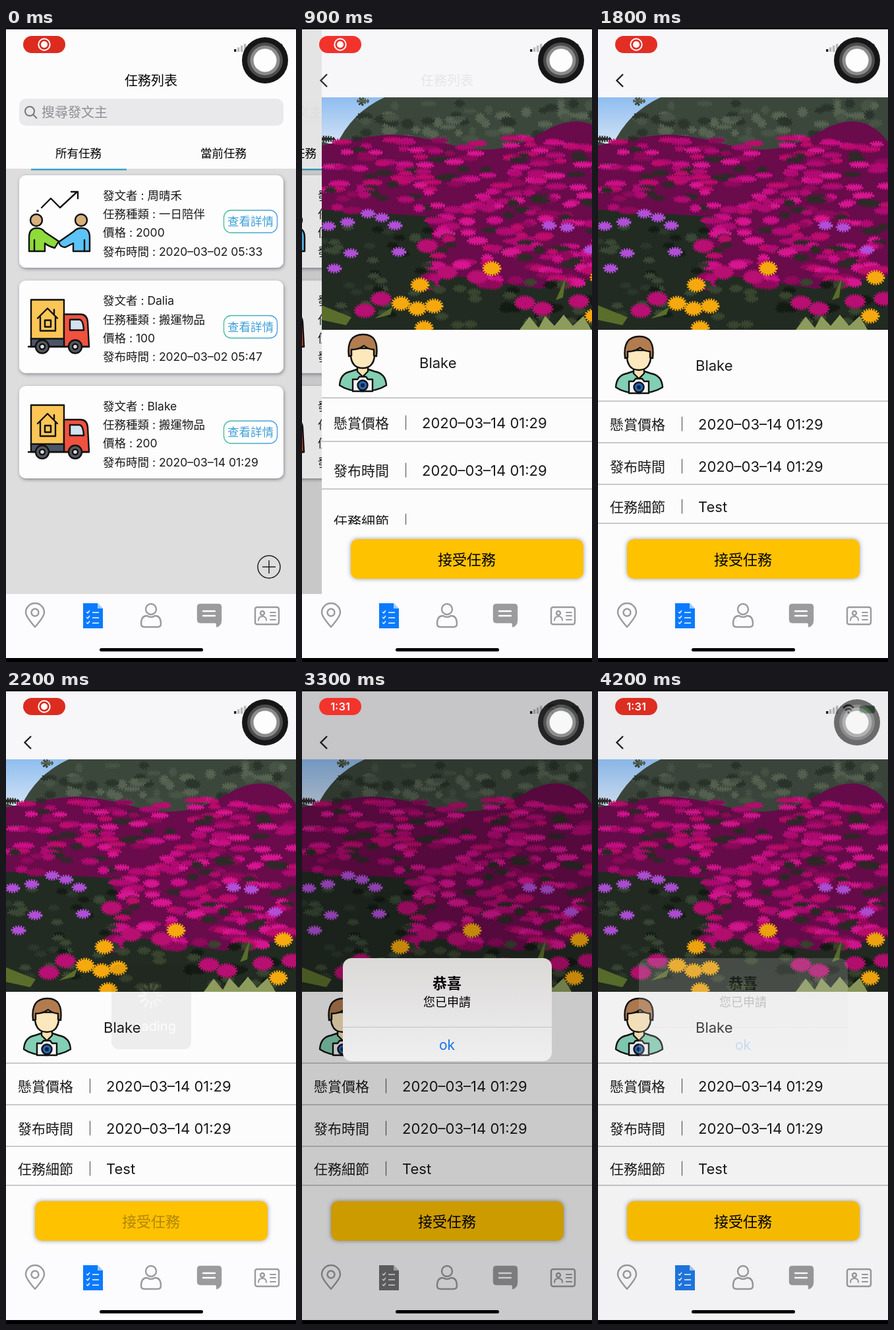
These frames come from a looping animation (440 by 960 pixels, 4.3 s). An HTML page:

```html
<!DOCTYPE html>
<html lang="zh-Hant">
<head>
<meta charset="utf-8">
<style>
html, body { margin: 0; width: 100%; height: 100%; overflow: hidden; background: #000; }
svg { display: block; }
text { font-family: Inter, "Noto Sans CJK TC", "Noto Sans CJK", sans-serif; white-space: pre; }
.ink { stroke: #111; stroke-width: 2.4; stroke-linejoin: round; stroke-linecap: round; }
.tab { fill: none; stroke: #9b9b9d; stroke-width: 2.4; stroke-linecap: round; stroke-linejoin: round; }
.petals { stroke-width: 5; stroke-dasharray: 2 1.6; }
</style>
</head>
<body>
<svg id="stage" width="440" height="960" viewBox="0 0 440 960"></svg>
<script>
const $ = id => document.getElementById(id);
const LOOP = 4300, WIDTH = 440;

const text = (x, y, str, size, attrs = 'fill="#1a1a1a"') =>
  `<text x="${x}" y="${y + size * .37}" font-size="${size}" ${attrs}>${str}</text>`;
const mid = 'text-anchor="middle"';
const rect = (x, y, w, h, fill, attrs = '') =>
  `<rect x="${x}" y="${y}" width="${w}" height="${h}" fill="${fill}" ${attrs}/>`;
const circle = (x, y, r, fill, attrs = '') =>
  `<circle cx="${x}" cy="${y}" r="${r}" fill="${fill}" ${attrs}/>`;
const ellipse = (x, y, rx, ry, color) =>
  `<ellipse cx="${x.toFixed(1)}" cy="${y.toFixed(1)}" rx="${rx.toFixed(1)}" ry="${ry.toFixed(1)}" fill="${color}" stroke="${color}"/>`;
const path = (d, fill = 'none', attrs = '') => `<path d="${d}" fill="${fill}" ${attrs}/>`;
const times = (n, fn) => Array.from({ length: n }, (_, i) => fn(i)).join('');

let seed = 11;
const rand = () => (seed = (seed * 16807) % 2147483647) / 2147483647;
const pick = list => list[Math.floor(rand() * list.length)];

// ---- list page ----
const handshake = `<g class="ink">
  ${path('M35 115V94q0-14 12-14q8 0 12 6l21 14l-6 10q-9-2-15-7v12z', '#8edb3a')}
  ${path('M127 115V94q0-14-12-14q-8 0-12 5l-23 16q2 8 10 8l12-6v12z', '#5cc3f6')}
  ${path('M43 115V98M119 115V98')}
  ${circle(46, 68, 9, '#d8b07c')}${circle(114, 68, 9, '#d8b07c')}
  ${path('M54 49l14-14l14 14l26-24M99 25h10v10')}
  ${circle(48, 54, .6, '#111')}</g>`;

const truck = `<g class="ink">
  ${rect(38, 29, 50, 61, '#fbc656')}
  ${path('M88 51h25q10 0 11 12l2 37H88z', '#f0523f')}
  ${path('M97 59h14q6 0 7 16H97z', '#d3e2ef')}
  ${rect(38, 88, 50, 12, '#4b5568')}
  ${path('M34 100h92M48 57l15-15l15 15M52 55v21h23V55M59 60h9v10h-9zM73 44v6')}
  ${circle(55, 100, 10, '#55585f')}${circle(105, 100, 10, '#55585f')}
  ${circle(55, 100, 4, '#ddd')}${circle(105, 100, 4, '#ddd')}</g>`;

const tasks = [
  ['周晴禾', '一日陪伴', 2000, '2020–03–02 05:33'],
  ['Dalia', '搬運物品', 100, '2020–03–02 05:47'],
  ['Blake', '搬運物品', 200, '2020–03–14 01:29']
];

const card = ([name, kind, price, date], i) => `<g transform="translate(0 ${223 + i * 159.5})">
  ${rect(20, 0, 401, 140, '#fdfdfd', 'rx="10" filter="url(#shadow)"')}
  ${i ? truck : handshake}
  ${[`發文者 : ${name}`, `任務種類 : ${kind}`, `價格 : ${price}`, `發布時間 : ${date}`]
    .map((line, k) => text(147, 30.5 + k * 28.2, line, 17.5)).join('')}
  <g id="more${i}">${rect(330.5, 53, 81, 34, '#fff', 'rx="11" stroke="url(#edge)" stroke-width="1.3"')}
  ${text(371, 70, '查看詳情', 17.5, mid + ' fill="#3f9fd6"')}</g></g>`;

const listPage = `<g id="list">
  ${rect(0, 0, WIDTH, 213, '#fdfcfd')}${rect(0, 213, WIDTH, 650, '#ddd')}
  <g id="search">${rect(20, 107, 401, 41, '#e9e9eb', 'rx="10"')}
  <g fill="none" stroke="#77777b" stroke-width="2">${circle(36, 126, 7, 'none')}${path('M41 131l6 6')}</g>
  ${text(54, 127.5, '搜尋發文主', 20, 'fill="#8e8e93"')}</g>
  ${text(110, 190, '所有任務', 17.5, mid)}${text(330, 190, '當前任務', 17.5, mid)}
  ${rect(38, 213, 145, 2.5, '#3ba6c8')}
  ${tasks.map(card).join('')}
  <g fill="none" stroke="#222" stroke-width="1.5">${circle(399, 816, 17, 'none')}${path('M389 816h20M399 806v20')}</g>
  </g>${rect(0, 0, WIDTH, 960, '#000', 'id="shade"')}`;

// ---- detail page ----
const pinks = ['#c90f86', '#b00b72', '#d6168f', '#bd0c6c', '#900a5c'];
const blobs = (list, rx, ry, color) => list.map(([x, y]) => ellipse(x, y, rx, ry, color)).join('');
const inShade = (x, y) => x < 165 && y > 278;

const photo = `<g clip-path="url(#photoClip)">
  ${rect(0, 105, WIDTH, 352, '#222b22')}
  ${rect(0, 105, 110, 80, 'url(#sky)')}
  ${path('M22 178Q45 128 95 105H440V200H0V172z', '#3c473c')}
  <g class="petals">
  ${times(70, () => ellipse(60 + rand() * 380, 110 + rand() * 62, 3 + rand() * 8, 2 + rand() * 4,
    pick(['#2b352c', '#566352', '#475446'])))}
  ${path('M0 178Q60 165 95 162T200 178T335 158T440 172V375L330 395L180 372L160 285L0 275z', '#6a0b4c')}
  ${times(320, i => {
    const x = rand() * WIDTH, depth = i / 320, y = 166 + depth * 225;
    const color = rand() < .2 ? '#2e2a28' : pick(pinks);
    return inShade(x, y) ? '' : ellipse(x, y, 6 + rand() * 9, 2.5 + depth * 4 * rand(), color);
  })}
  ${times(40, () => ellipse(rand() * 165, 300 + rand() * 150, 7, 3, pick(['#3a4836', '#141c15', '#2c382b'])))}
  ${times(30, () => ellipse(170 + rand() * 270, 385 + rand() * 65, 8, 4, pick(['#39452f', '#141a14'])))}
  ${blobs([[65, 428], [90, 410], [236, 377], [190, 370], [308, 416], [335, 425], [390, 414], [434, 410], [160, 330]], 14, 9, '#b80f72')}
  ${blobs([[10, 300], [44, 341], [117, 339], [70, 281], [91, 287], [111, 299], [39, 294], [19, 364], [345, 299], [372, 302], [408, 336]], 9, 5, '#b04fd6')}
  </g>
  ${path('M0 420l45 18l-8 12l-37-8zM80 440l28-18l-4 12zM355 412l15-34l-4 30z', '#5a6e2b')}
  <g class="petals">
  ${blobs([[149, 389], [120, 417], [145, 425], [170, 421], [258, 364], [421, 378], [413, 436], [155, 454]], 12, 9, '#f5a90f')}
  </g>
  ${path('M300 457l15-20l14 17l10-18l14 15l14-17l14 17l16-15l12 21z', '#8d9c5c')}</g>`;

const avatar = `<g id="avatar"><g class="ink">
  ${path('M27 544q1-18 17-21l9-3h18l9 3q17 3 18 21q-14 9-36 9t-35-9z', '#83cfb3')}
  ${path('M54 514v9l8 8l8-8v-9z', '#fbe2b0')}
  ${path('M44 488v12q2 18 18 18t18-18v-12z', '#fde8bd')}
  ${path('M41 500q-4-33 22-33q24 0 20 33l-4-1v-9q-10-1-15-6q-8 6-19 6v9z', '#b27c4f')}
  ${path('M47 535h7l3-4h10l3 4h7v18H47z', '#f3f3f3')}
  ${circle(62, 544, 7.5, '#2566b8')}</g>${circle(62, 544, 3, '#123')}</g>`;

const rows = [['懸賞價格', '2020–03–14 01:29'], ['發布時間', '2020–03–14 01:29'], ['任務細節', 'Test']];
const detailPage = `<g id="detail">
  ${rect(0, 0, WIDTH, 960, '#fdfcfd')}${rect(0, 0, WIDTH, 105, '#f7f6f8')}
  ${photo}
  <g clip-path="url(#rowsClip)">${avatar}
  <g id="row0">${text(148, 0, 'Blake', 22)}</g>
  ${rows.map(([label, value], i) => `<g id="row${i + 1}">${text(18, 0, label, 21)}
    ${path('M127.5-11.5v22', 'none', 'stroke="#666" stroke-width="1.3"')}
    ${text(152, 0, value, 22, `fill="#1a1a1a" id="value${i}"`)}</g>`).join('')}
  ${times(4, i => rect(0, -1, WIDTH, 2, '#c9c8ca', `id="line${i}"`))}</g>
  ${rect(44, 774, 353, 60, '#ffc200', 'rx="10" filter="url(#glow)"')}
  ${text(220, 804.5, '接受任務', 22, mid + ' id="accept"')}</g>`;

// ---- chrome and overlays ----
const tabBar = `${rect(0, 857, WIDTH, 100, '#fcfbfd')}<g class="tab">
  ${path('M44 907q-14-16-14-22a14 14 0 0 1 28 0q0 6-14 22z')}${circle(44, 885, 5.5, 'none')}
  ${circle(220, 880, 8, 'none')}${path('M205 902q0-12 9-12q6 4 12 0q9 0 9 12q0 5-5 5h-20q-5 0-5-5z')}
  ${path('M295 873h27q4 0 4 4v20q0 7-6 9q1-4-2-6h-23q-4 0-4-4v-19q0-4 4-4z', '#9b9b9d')}
  ${path('M299 883h18M299 890h18', 'none', 'stroke="#fff"')}
  ${rect(378, 877, 36, 26, 'none', 'rx="3"')}${circle(389, 886, 3, 'none')}
  ${path('M383 897q0-6 6-6t6 6M401 885h8M401 890h8M401 896h8', 'none', 'stroke-width="2"')}</g>
  ${path('M117 871h22l8 8v30h-30z', '#0a7aff', 'id="activeTab"')}${path('M139 871v8h8z', '#fff', 'opacity=".6"')}
  ${path('M122 884l2 2l3-4M122 892l2 2l3-4M122 900l2 2l3-4M131 885h10M131 893h10M131 901h10', 'none', 'stroke="#fff" stroke-width="1.3"')}`;

const statusIcons = `<g>
  ${times(4, i => rect(346 + i * 5, 32 - i * 2.7, 3.4, 4 + i * 2.7, i ? '#b9b9bb' : '#222'))}
  ${path('M372 27q8-8 16 0M375 31q5-5 10 0', 'none', 'stroke="#222" stroke-width="2.5"')}${circle(380, 34, 1.7, '#222')}
  ${rect(397, 24, 23, 11, '#4f8f5a', 'rx="3" stroke="#888"')}</g>`;

const pill = `${rect(26, 12, 64, 26, '#e03', 'rx="13" id="pill"')}
  <g id="record">${circle(58, 25, 8.7, 'none', 'stroke="#fff" stroke-width="2"')}${circle(58, 25, 5, '#fff')}</g>
  ${text(58, 25, '1:31', 16.5, mid + ' fill="#fff" font-weight="600" id="clock"')}`;

const hud = `<g id="hud">${rect(160, 416, 121, 128, '#000', 'rx="11" opacity=".6"')}
  <g id="spinner">${times(12, i => path('M0-9V-18', 'none',
    `stroke="#fff" stroke-width="3.3" stroke-linecap="round" opacity="${.25 + i * .065}" transform="rotate(${i * 30})"`))}</g>
  ${text(220, 509, 'Loading', 20, mid + ' fill="#fff"')}</g>`;

const alertBox = `<g id="alert">${rect(62, 406, 317, 156, 'url(#glass)', 'rx="13"')}
  ${path('M62 510H379V549q0 13-13 13H75q-13 0-13-13z', '#cfcfd2', 'id="okRow"')}
  ${rect(62, 510, 317, 1, '#c4c3c5')}
  ${text(220, 444, '恭喜', 22, mid + ' font-weight="600"')}
  ${text(220, 472, '您已申請', 18, mid)}
  ${text(220, 537, 'ok', 21, mid + ' fill="#1577e6"')}</g>`;

const touch = `<g id="touch">${circle(393, 49, 35, '#161616')}${circle(393, 49, 27, '#4c4c4c')}
  ${circle(393, 49, 22.5, '#8b8b8b')}${circle(393, 49, 17.5, '#fdfdfd')}</g>`;

const gradient = (id, dir, a, b) => `<linearGradient id="${id}" ${dir}>
  <stop stop-color="${a}"/><stop offset="1" stop-color="${b}"/></linearGradient>`;
const shadow = (id, dx, dy, blur, color) => `<filter id="${id}" x="-5%" y="-15%" width="110%" height="130%">
  <feDropShadow dx="${dx}" dy="${dy}" stdDeviation="${blur}" flood-color="${color}" flood-opacity=".5"/></filter>`;
const down = 'x1="0" y1="0" x2="0" y2="1"';

$('stage').innerHTML = `<defs>
  ${gradient('edge', '', '#45bd9b', '#4b9be6')}${gradient('sky', down, '#8fbdf0', '#dbe8f6')}
  ${gradient('glass', down, '#dbd9d8', '#f0eff0')}
  ${shadow('shadow', 1, 2, 2.5, '#333344')}${shadow('glow', 0, 0, 3, '#223355')}
  <clipPath id="photoClip">${rect(0, 105, WIDTH, 352, '#000')}</clipPath>
  <clipPath id="rowsClip">${rect(0, 457, WIDTH, 295, '#000')}</clipPath></defs>
  ${listPage}${detailPage}${tabBar}${statusIcons}
  ${path('M38 70l-9.5 9.5l9.5 9.5', 'none', 'stroke="#222" stroke-width="2.4" id="back"')}
  ${text(220, 80, '任務列表', 20, mid + ' font-weight="500" id="title"')}
  ${rect(0, 0, WIDTH, 960, '#000', 'id="dim"')}
  ${rect(142, 939, 157, 5, '#000', 'rx="2.5"')}
  ${pill}${hud}${alertBox}${touch}
  ${rect(0, 0, WIDTH, 2, '#000')}${rect(0, 954, WIDTH, 6, '#000')}`;

// ---- motion ----
const ramp = (t, a, b) => Math.min(1, Math.max(0, (t - a) / (b - a)));
const spring = (t, start, rate) => {
  const k = Math.max(0, t - start) / 1000 * rate;
  return k > 8.5 ? 1 : 1 - (1 + k) * Math.exp(-k);
};
const press = (t, a, b) => 1 - .7 * (ramp(t, a, a + 60) - ramp(t, b, b + 250));
const mix = (a, b, k) => `rgb(${a.map((v, i) => Math.round(v + (b[i] - v) * k))})`;
const fade = (id, value) => $(id).setAttribute('opacity', value);
const move = (id, x, y, more = '') => $(id).setAttribute('transform', `translate(${x} ${y}) ${more}`);

function layoutRows(settled) {
  const centers = settled ? [511, 600, 664, 725] : [507, 598, 670, 747];
  const lines = settled ? [565, 628, 691, 750] : [560, 626, 698, 780];
  centers.forEach((y, i) => move('row' + i, 0, y));
  lines.forEach((y, i) => move('line' + i, 0, y));
  move('avatar', 0, settled ? 0 : -3);
  fade('value2', +settled);
}

function draw(t) {
  const push = spring(t, 600, 14.5);
  move('list', -.3 * WIDTH * push, 0);
  move('detail', WIDTH * (1 - push), 0);
  fade('shade', .1 * push);
  fade('title', 1 - push);
  fade('search', 1 - push);
  fade('back', push);
  layoutRows(t >= 1100);
  fade('more2', press(t, 480, 620));
  fade('accept', press(t, 2100, 2230));

  fade('hud', ramp(t, 2180, 2400) - ramp(t, 2600, 2830));
  move('spinner', 220, 463, `rotate(${Math.floor(t / 83) * 30})`);

  const shown = spring(t, 2600, 20), leave = 1 - ramp(t, 4000, 4250);
  const scale = 1.2 - .2 * shown;
  fade('alert', shown * leave);
  move('alert', 220.5, 484, `scale(${scale}) translate(-220.5 -484)`);
  fade('okRow', ramp(t, 3820, 3880) - ramp(t, 3950, 4050));
  fade('dim', .2 * shown * leave);
  $('activeTab').setAttribute('fill', mix([10, 122, 255], [112, 112, 116], ramp(t, 2700, 2900) * leave));

  $('pill').setAttribute('fill', mix([220, 44, 32], [243, 52, 45], .5 - .5 * Math.cos(t / 2200 * 2 * Math.PI)));
  const clock = ramp(t, 2400, 2600);
  fade('record', 1 - clock);
  fade('clock', clock);
  fade('touch', 1 - .4 * ramp(t, 3200, 3700));
}

function tick() {
  draw(performance.now() % LOOP);
  requestAnimationFrame(tick);
}
tick();
</script>
</body>
</html>
```
